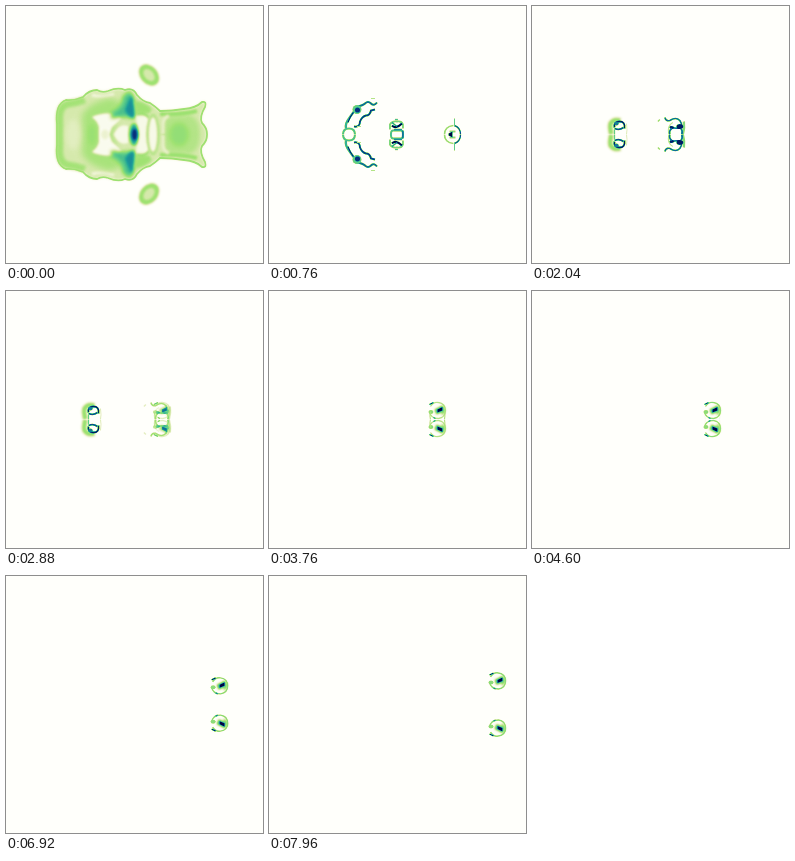
These frames come from a looping animation (257x257 px, 8000 ms). An HTML page with a canvas:

```html
<!DOCTYPE html>
<html lang="en">
<head>
<meta charset="utf-8">
<title>Cellular gliders</title>
<style>
html, body { margin: 0; width: 100%; height: 100%; overflow: hidden; background: #fffffb; }
canvas { display: block; width: 100vw; height: 100vh; }
</style>
</head>
<body>
<canvas id="stage" width="257" height="257"></canvas>
<script>
const SIZE = 257, AXIS = 128.5, LOOP = 8000;
const screen = document.getElementById('stage').getContext('2d');
const inkCanvas = document.createElement('canvas');
inkCanvas.width = inkCanvas.height = SIZE;
const ink = inkCanvas.getContext('2d', { willReadFrequently: true });
const image = screen.createImageData(SIZE, SIZE);

const clamp = v => Math.min(1, Math.max(0, v));
const ramp = (t, a, b) => { const p = clamp((t - a) / (b - a)); return p * p * (3 - 2 * p); };
const mix = (a, b, p) => a + (b - a) * p;

// Density to colour
const stops = [
  [0, 255, 255, 251], [.12, 238, 243, 212], [.22, 211, 232, 168], [.35, 160, 226, 114],
  [.5, 95, 206, 134], [.65, 31, 163, 152], [.8, 15, 106, 152], [.9, 6, 48, 124], [1, 0, 4, 64]
];
const palette = Array.from({ length: 256 }, (_, i) => {
  const v = i / 255;
  const k = Math.max(1, stops.findIndex(s => s[0] >= v));
  const [a, b] = [stops[k - 1], stops[k]];
  const p = (v - a[0]) / (b[0] - a[0]);
  return [1, 2, 3].map(c => mix(a[c], b[c], p));
});

const grey = level => { const v = Math.round(level * 255); return `rgb(${v},${v},${v})`; };

function line(path, level, width = 1.5, blur = .5) {
  ink.filter = `blur(${blur}px)`;
  ink.strokeStyle = grey(level);
  ink.lineWidth = width;
  ink.stroke(new Path2D(path));
}

function fill(path, level, blur = 2) {
  ink.filter = `blur(${blur}px)`;
  ink.fillStyle = grey(level);
  ink.fill(typeof path === 'string' ? new Path2D(path) : path);
}

function oval(x, y, rx, ry, level, blur = 1, turn = 0) {
  const path = new Path2D();
  path.ellipse(x, y, rx, ry, turn, 0, 7);
  fill(path, level, blur);
}

function place(x, y, alpha, draw, scale = 1) {
  if (alpha <= 0) return;
  ink.save();
  ink.translate(x, y);
  ink.scale(scale, scale);
  ink.globalAlpha = alpha;
  draw();
  ink.restore();
}

// Only the upper half is drawn; the lower half is its reflection.
function mother() {
  // Rippled shell with a paler band inside
  const shell = 'M51 142V118Q49 98 60 94Q68 95 77 91Q83 84 91 84Q96 87 102 85Q112 81 119 84' +
    'Q127 81 131 89Q137 96 144 97Q150 101 154 105Q166 105 178 103Q190 102 196 96Q201 95 199 101' +
    'Q193 111 196 117Q201 122 201 128V142';
  fill(shell + 'Z', .21, 1.5);
  line(shell, .36, 1.8, .7);
  line('M54 138V118Q52 100 62 98Q71 97 79 94', .34, 7, 1.4);
  line('M86 89Q96 92 108 88', .1, 3, 1);

  // Left body
  fill('M76 140V108Q86 95 104 92L118 97L112 110L104 140Z', .33, 3);
  oval(67, 128.5, 7, 15, .17, 2.5);
  oval(86, 128.5, 4, 11, .37, 2);
  fill('M86 111Q96 106 110 108L116 112L106 121L103 128.5V140H93V124Q94 117 86 111Z', .04, 1.2);
  oval(99, 128.5, 4, 5, .13, 1.2);

  // Dense wings and core
  fill('M105 107Q117 102 117 90L124 85Q131 96 129 113Q118 109 105 113Z', .55, 2.2);
  fill('M119 104L125 89Q130 98 128 112Q122 111 119 104Z', .7, 1.5);
  fill('M128 95Q138 94 146 103L143 108L130 107Z', .35, 1.6);
  fill('M130 110H141Q146 117 142 128V140H133Z', .06, 1.5);
  line('M131 108Q139 106 143 112', .4, 2, 1);
  fill('M108 128.5Q113 117 122 120V140H112Z', .06, 1.3);
  oval(128, 128.5, 4.5, 11, .65, 1.8);
  oval(128.5, 128.5, 3, 6, .9, 1.3);

  // Neck ring and right body
  oval(147, 128.5, 7, 21, .3, 1.2);
  oval(147, 128.5, 4, 17, .06, 1.2);
  fill('M157 140V118Q159 108 168 109H184Q194 113 194 128V140Z', .3, 2);
  line('M154 108Q174 109 191 105', .37, 4, 1.3);
  line('M157 128V117Q158 111 163 110', .14, 3, 1.2);
  oval(173, 128.5, 10, 12, .38, 2.5);

  oval(143, 69, 9, 12, .36, 1, -.7);
  oval(143, 69, 4.5, 7, .21, 1.3, -.7);
}

function wings() {
  line('M-6 0Q-6-6 0-6T6 0', .55, 2.2);
  line('M-3-6Q-4-11 0-16Q4-22 6-24', .6, 2.4);
  line('M-1-12Q1-18 5-23', .95, 1.2);
  line('M8-28Q14-29 16-31Q19-34 22-31T28-32', .8, 2);
  line('M5-8Q11-7 11-13Q13-18 17-19Q21-19 22-24L26-25', .88, 2);
  oval(8, -25, 4.5, 4.5, .5, .5);
  oval(8.5, -24.5, 2.6, 2.6, .9, .6);
  line('M22-36h4M8-8h4', .3, 1);
}

function cluster() {
  line('M-4-4H4Q6-4 6 0T4 4H-4Q-6 4-6 0T-4-4Z', .55, 2);
  line('M6-4V4', .85, 1.4);
  line('M-7-5V-10Q-5-14 0-13Q5-14 6-10V-6', .45, 1.8);
  line('M-5-9Q-1-5 5-11', 1, 2.2);
  line('M-5-12L0-8M-3-5H5', .7, 1.4);
  line('M-2-15H1', .55, 1.4);
}

function spinner() {
  line('M1-9Q-8-8-8 0', .38, 1.6);
  line('M2-9Q8-7 8 0', .85, 1.4);
  line('M-3-3H3', .4, 2);
  fill('M-4-1L0-3V4L-4 2Z', 1, .6);
  line('M2-8V-16', .5, 1);
}

function twinLobes() {
  line('M-7 0Q-9-7-8-11Q-5-16 2-14', .37, 5, .9);
  line('M-4-7Q-5-13 1-13Q7-13 6-6', .95, 1.8);
  oval(-2, -11, 2.2, 2, .75, .6);
  line('M-4-6Q1-4 5-7', .85, 1.8);
  line('M8-11Q9-4 8 0', .2, 1);
  line('M-4 0V-5', .5, 1.3);
}

function hatchlings() {
  line('M-7 0Q-9-9-3-12', .28, 1.2);
  line('M8-13Q9-6 7 0', .42, 2.4, .7);
  line('M-11-17Q-10-13-6-14Q0-18 4-14Q6-11 6-8', .8, 1.6);
  line('M-6-8Q-1-5 6-7', .8, 1.6);
  oval(4, -8, 3.4, 2.6, .95, .6);
  oval(-4, -7, 2.2, 1.6, .95, .5);
  line('M-4-6Q-7-4-6 0M5-6Q7-4 6 0', .8, 1.7);
  line('M-18-13l2-2', .4, 1.4);
}

function glider(join) {
  line('M-7-4Q-4-9 1-8Q8-7 8 0Q8 7 1 8Q-7 8-8 1', mix(.42, .3, join), 1.4);
  fill('M4-5Q8-4 8 0Q7 5 4 5Z', .38, 1);
  oval(-6.5, 1.5, 2.5, 2, .4, .7);
  fill('M-3-1L5-5L6 1L-1 4Z', .62, 1);
  fill('M0-1L5-3.5L5 0L0 2Z', 1, .6);
  line('M-8-6L-4-8', .95, 1.3);
  line('M-4 7L-2 8', .75, 1.2);
}

function drawInk(t) {
  ink.globalAlpha = 1;
  ink.filter = 'none';
  ink.fillStyle = '#000';
  ink.fillRect(0, 0, SIZE, SIZE);

  place(0, 0, 1 - ramp(t, 0, 560), mother);

  const shrink = 1 + (760 - t) * .0003;
  place(80, AXIS, ramp(t, 160, 600) * (1 - ramp(t, 1200, 1760)), wings, shrink);
  place(183.5, AXIS, ramp(t, 160, 600) * (1 - ramp(t, 1300, 1760)), spinner, 1 - .4 * ramp(t, 1100, 1760));

  const lobesScale = 1 - .6 * ramp(t, 2900, 3520);
  place(86.5, AXIS, ramp(t, 1240, 1800) * (1 - ramp(t, 3200, 3560)), twinLobes, lobesScale);

  const x = 228.5 - .0143 * (7960 - Math.max(t, 760));
  place(x + 2.4, AXIS, ramp(t, 160, 600) * (1 - ramp(t, 1100, 1700)), cluster);
  place(x, AXIS, ramp(t, 1100, 1700) * (1 - ramp(t, 2500, 3200)), hatchlings);

  const gap = Math.max(9, 11.5 + .0047 * (t - 5400));
  const join = 1 - ramp(t, 4000, 4800);
  const grown = ramp(t, 2500, 3200);
  place(x, AXIS - gap, grown, () => glider(join));
  place(x, AXIS, grown * join, () => line('M-7-8Q-8-3-7 0M7-8Q8-3 7 0', .32, 1.2));
}

function render(t) {
  drawInk(t);
  const density = ink.getImageData(0, 0, SIZE, SIZE).data;
  for (let y = 0; y < SIZE; y++) {
    const row = Math.min(y, SIZE - 1 - y);
    for (let x = 0; x < SIZE; x++) {
      const color = palette[density[(row * SIZE + x) * 4]];
      const at = (y * SIZE + x) * 4;
      image.data[at] = color[0];
      image.data[at + 1] = color[1];
      image.data[at + 2] = color[2];
      image.data[at + 3] = 255;
    }
  }
  screen.putImageData(image, 0, 0);
}

const start = performance.now();
let shown = -1;
function tick() {
  const time = Math.max(0, performance.now() - start) % LOOP;
  const step = time < 80 ? 0 : Math.floor(time / 40) * 40;
  if (step !== shown) render(shown = step);
  requestAnimationFrame(tick);
}
tick();
</script>
</body>
</html>
```
